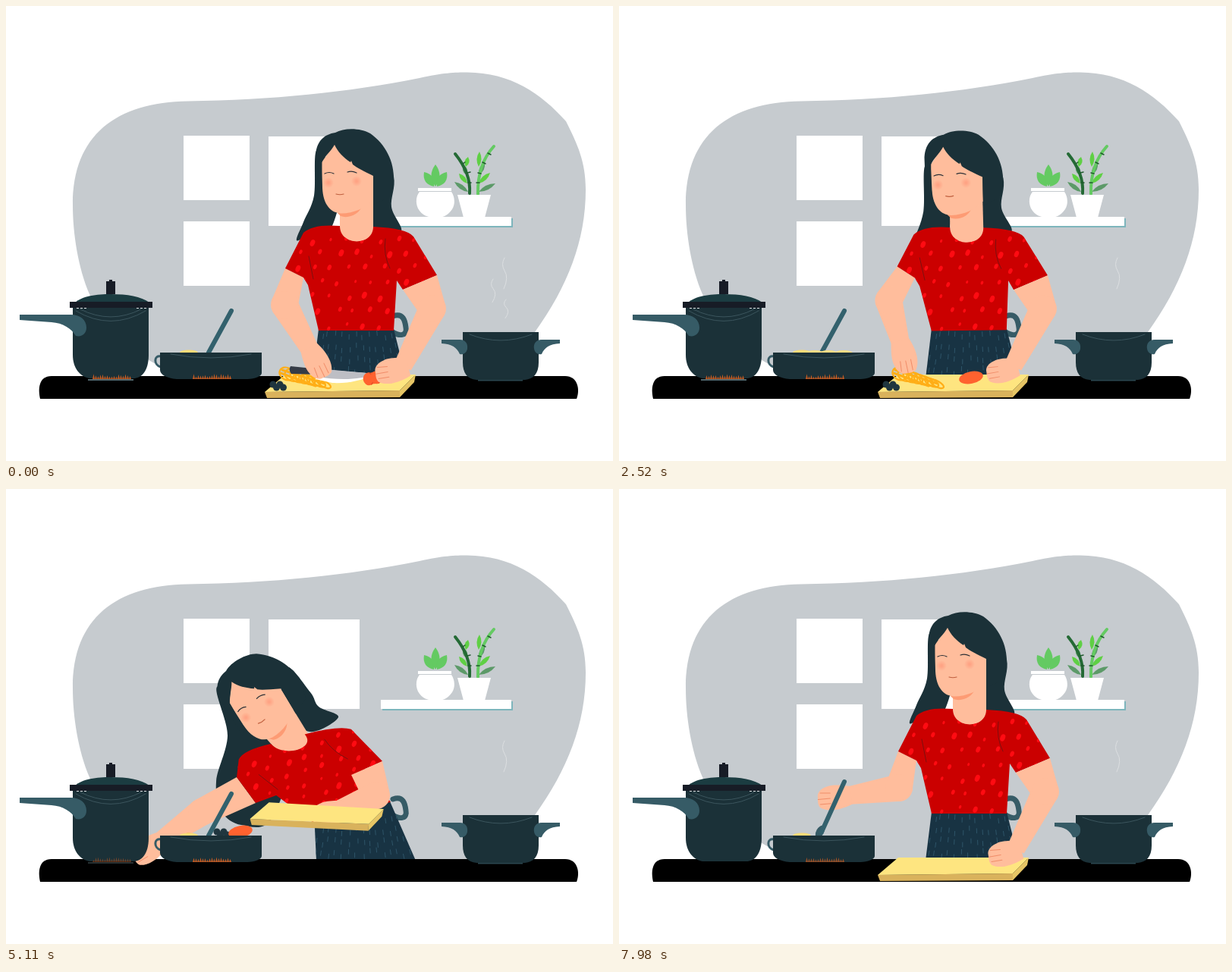
An HTML page with a canvas for the animation above (8000 ms loop, 800 px wide and 600 px high).

```html
<!DOCTYPE html>
<html lang="en">
<head>
<meta charset="utf-8">
<title>Kitchen</title>
<style>
html, body { margin: 0; width: 100%; height: 100%; overflow: hidden; background: #fff; }
canvas { display: block; width: 800px; height: 600px; }
</style>
</head>
<body>
<canvas id="stage" width="800" height="600"></canvas>
<script>
const g = document.getElementById('stage').getContext('2d');
const LOOP = 8000, STEP = 70;
const DARK = '#1b3138', TEAL = '#365b66', SKIN = '#ffbd9c', LINE = '#f08d69';
const ORANGE = '#ff622f', YELLOW = '#ffae17', RIM = '#3b555d', BLACK = '#171c26';

// ---- drawing helpers
const shape = d => d instanceof Path2D ? d : new Path2D(d);
const fill = (d, color) => { g.fillStyle = color; g.fill(shape(d)); };
const stroke = (d, color, width = 1) => {
  g.strokeStyle = color; g.lineWidth = width; g.lineCap = 'round';
  g.stroke(shape(d));
};
const box = (x, y, w, h, color) => { g.fillStyle = color; g.fillRect(x, y, w, h); };
const ellipse = (x, y, rx, ry, turn = 0) => {
  const d = new Path2D();
  d.ellipse(x, y, rx, ry, turn, 0, 7);
  return d;
};
const placed = (x, y, turn, draw) => {
  g.save(); g.translate(x, y); g.rotate(turn); draw(); g.restore();
};
const faded = (alpha, draw) => { g.save(); g.globalAlpha = alpha; draw(); g.restore(); };
const poly = pts => `M${pts.join('L')}Z`;
// closed smooth curve that passes through the points
const smooth = pts => {
  const p = i => pts[(i + pts.length) % pts.length];
  const lead = (i, side) => [0, 1].map(c => p(i)[c] + side * (p(i + 1)[c] - p(i - 1)[c]) / 6);
  return `M${p(0)}` + pts.map((_, i) => `C${lead(i, 1)} ${lead(i + 1, -1)} ${p(i + 1)}`).join('') + 'Z';
};

// ---- motion helpers
const rnd = n => { const s = Math.sin(n * 12.9898) * 43758.5453; return s - Math.floor(s); };
const lerp = (a, b, k) => a + (b - a) * k;
const mix = (a, b, k, ky = k) => [lerp(a[0], b[0], k), lerp(a[1], b[1], ky)];
const ramp = (from, to, t) => {
  const k = Math.min(1, Math.max(0, (t - from) / (to - from)));
  return k * k * (3 - 2 * k);
};
const pulse = (a, b, c, d, t) => ramp(a, b, t) - ramp(c, d, t);

// ---- room
function leaf(x, y, tx, ty, w, color) {
  const dx = tx - x, dy = ty - y, n = Math.hypot(dx, dy) / w;
  const mx = x + dx / 2, my = y + dy / 2;
  fill(`M${x} ${y}Q${mx - dy / n} ${my + dx / n} ${tx} ${ty}Q${mx + dy / n} ${my - dx / n} ${x} ${y}`, color);
}

function room() {
  fill('M88 262C88 170 145 127 240 125.5C350 124 450 114 545 95C575 88 592 87.5 608 87.5C665 88 705 115 738 152C753 182 764 205 764 242C764 310 740 370 697 430C680 455 660 475 640 489H240C215 483 188 468 170 455C150 440 125 410 110 380C95 345 88 300 88 262Z', '#c6cbcf');
  box(234, 171, 87, 85, '#fff');
  box(234, 284, 87, 85, '#fff');
  box(346, 172, 120, 118, '#fff');
  box(496, 280, 172, 12, '#7db5bc');
  box(494, 278, 172, 12, '#fff');
  plants();
}

function plants() {
  const green = '#64ca62', deep = '#246a35', dull = '#5c9a68', lime = '#5fd044';
  box(543, 240, 44, 4, '#fff');
  fill('M545 245H587C592 252 592 262 588 268C582 277 575 279 566 279C556 279 548 276 543 267C539 258 541 250 545 245Z', '#fff');
  for (const side of [-1, 0, 1])
    leaf(566 + side * 2, 238, 566 + side * 15, 209 + Math.abs(side) * 10, 11, green);
  // pairs of leaves climb both stems
  for (let i = 0; i < 4; i++) {
    const y = 245 - i * 11;
    leaf(609 - i, y, 591 + i * 6, y - 13, 6, i % 2 ? lime : dull);
    leaf(623, y, 645 - i * 7, y - 11 - i * 3, 6, i % 2 ? lime : dull);
  }
  stroke('M611 247Q613 221 592 195', deep, 4);
  stroke('M622 248Q621 209 643 185', green, 4);
  stroke('M609 233h4M608 220l4 -1M602 208l3 -2M620 233h4M622 220l4 1M628 206l4 2M635 194l4 2', '#1f5a2c', 1.5);
  fill('M595 249H639L631 279H603Z', '#fff');
}

function steam(t) {
  const wisp = (x, y, alpha, h = 1) => faded(alpha, () =>
    stroke(`M${x} ${y}q-5 ${9 * h} 0 ${17 * h}q6 ${9 * h} -1 ${24 * h}`, '#dcdfe1'));
  const puff = 1 - pulse(800, 1300, 2500, 3000, t) - ramp(4500, 4900, t);
  wisp(657, 332, 1);
  wisp(642, 360, puff, .75);
  wisp(659, 387, puff * (1 - pulse(800, 1300, 3400, 3900, t)), .6);
  wisp(298, 370, pulse(2700, 3200, 3200, 3700, t), .6);
  wisp(267, 382, pulse(5900, 6400, 6500, 7000, t), 1.2);
}

// ---- cook: "lean" runs from 0 (upright) to 1 (bent over the pan)

// moves a point of the upright torso: slides, tilts and shears about the neck
const torso = lean => (x, y) => {
  const dx = x - 440, dy = y - 290;
  return [440 - 91 * lean + dx + .63 * lean * dy,
    290 + 46 * lean - .3 * lean * dx + (1 - .29 * lean) * dy];
};

function limb(a, b, elbow, wrist) {
  const across = (p, q, r) => {
    const n = Math.hypot(q[0] - p[0], q[1] - p[1]) / r;
    return [(p[1] - q[1]) / n, (q[0] - p[0]) / n];
  };
  const off = (p, v, s) => [p[0] + v[0] * s, p[1] + v[1] * s];
  const middle = mix(a, b, .5);
  const u = across(middle, elbow, 18), w = across(elbow, wrist, 18), end = across(elbow, wrist, 12);
  fill(poly([a, b, off(elbow, u, -1), off(elbow, u, 1)]), SKIN);
  fill(poly([off(elbow, w, 1), off(elbow, w, -1), off(wrist, end, -1), off(wrist, end, 1)]), SKIN);
  fill(ellipse(...elbow, 18, 18), SKIN);
}

function hand(x, y, turn, long = 1, wide = 1) {
  placed(x, y, turn, () => {
    g.scale(long, wide);
    fill('M-22 -12C0 -19 14 -16 21 -10C24 -4 22 0 22 4C22 10 16 15 8 16C0 18 -12 15 -22 12Z', SKIN);
    stroke('M6 -7L20 -6M6 0L22 1M5 7L18 9', LINE);
  });
}

function hair(lean) {
  const fall = Math.pow(lean, .4);
  const strand = (upright, bent, ky) =>
    fill(smooth(upright.map((p, i) => mix(p, bent[i], lean, ky))), DARK);
  strand([[410, 190], [406, 250], [392, 285], [383, 309], [400, 302], [425, 300], [440, 240]],
    [[281, 260], [292, 325], [277, 385], [284, 425], [310, 443], [350, 435], [370, 340]], fall);
  strand([[490, 180], [511, 225], [508, 265], [521, 297], [490, 300], [470, 240]],
    [[370, 235], [401, 268], [412, 287], [438, 301], [400, 320], [365, 290]], lean);
}

function head(lean) {
  placed(443.5 - 112 * lean, 232 + 59 * lean, -.54 * lean, () => {
    g.translate(-443.5, -232);
    fill('M436 272C450 274 460 270 469 264C466 274 452 281 441 277Z', '#fd9b74');
    fill('M416 206L433 182L470 195H484V256C475 266 458 273.5 442 273.5C428 273 418 262 417 240Z', SKIN);
    for (const [x, y] of [[425, 233], [462, 231]]) {
      const blush = g.createRadialGradient(x, y, 1, x, y, 7);
      blush.addColorStop(0, '#ffa384');
      blush.addColorStop(1, '#ffa38400');
      fill(ellipse(x, y, 7, 7), blush);
    }
    stroke('M420 221Q426 218 432 221M450 219Q456 217 462 220', '#2b3036', 1.2);
    stroke('M435 248Q440 249.5 445 248', '#c0603f', 1.2);
    fill('M408 200C408 178 420 169 434 167C446 160 468 161 480 168C500 182 512 205 511 230L506 252L484 262V224C472 218 462 213 457 209L455 204L454 206C445 200 437 192 433 183C428 192 419 199 416.5 206C416 225 416 235 417 245L409 250Z', DARK);
  });
}

function skirt(lean, at) {
  const d = shape(poly([at(412, 426), at(511, 426), [527 + 13 * lean, 490], [404 + 5 * lean, 490]]));
  fill(d, '#183343');
  g.save();
  g.clip(d);
  for (let i = 0; i < 60; i++) {
    const x = 405 + i % 15 * 9 + rnd(i) * 5, y = 428 + Math.floor(i / 15) * 15 + rnd(i + 70) * 9;
    stroke(`M${x} ${y}l${(x - 460) / 50} 6`, '#2d5468');
  }
  g.restore();
}

function shirt(at, left, right) {
  const d = shape(`M${at(440, 290)}Q${at(405, 287)} ${at(392, 299)}L${left[0]}L${left[1]}L${at(398, 368)}
    L${at(412, 428)}L${at(511, 428)}L${at(515, 362)}L${right[0]}L${right[1]}L${at(537, 304)}
    Q${at(528, 293)} ${at(484, 291)}C${at(484, 317)} ${at(440, 317)} ${at(440, 290)}Z`);
  fill(d, '#cb0000');
  g.save();
  g.clip(d);
  for (let i = 0; i < 56; i++) {
    const row = Math.floor(i / 8), r = 1.4 + rnd(i) * 1.8;
    const x = 376 + i % 8 * 23 + row % 2 * 11 + rnd(i + 20) * 9, y = 304 + row * 19 + rnd(i + 40) * 9;
    fill(ellipse(...at(x, y), r, r * 1.5, .4), '#ff0b12');
  }
  stroke(`M${at(500, 307)}Q${at(497, 328)} ${at(506, 346)}M${at(399, 330)}L${at(405, 360)}`, '#7d1010');
  g.restore();
}

// elbow and wrist of the stirring arm: chop, reach, steady, pour, rest, stir
const ARM = [
  [0, 367, 394, 400, 452], [2150, 367, 394, 400, 452], [3220, 325, 373, 294, 419],
  [4200, 279, 391, 222, 430], [5110, 258, 426, 204, 464], [5280, 258, 426, 204, 464],
  [6400, 371, 399, 374, 467], [6900, 371, 399, 374, 467], [7600, 369, 394, 304, 404], [LOOP, 369, 394, 304, 404]];

function armPose(t) {
  const i = ARM.findIndex(row => row[0] > t), a = ARM[i - 1], b = ARM[i];
  const [, ex, ey, wx, wy] = a.map((v, c) => lerp(v, b[c], ramp(a[0], b[0], t)));
  return { elbow: [ex, ey], wrist: [wx, wy] };
}

// ---- board and food
function board(lift) {
  placed(442 - 31 * Math.sin(lift * Math.PI / 2), 497 - 69 * lift, .08 * Math.sin(lift * Math.PI * .75), () => {
    g.scale(1 - .12 * lift, 1);
    fill('M-101 12L77 10V19L-98 20Z', '#d9b25c');
    fill('M98 -11L96 -1L77 19V10Z', '#e6c565');
    fill('M-74 -11H98L77 10L-101 12Z', '#fee580');
  });
}

function noodles() {
  for (let i = 0; i < 8; i++)
    stroke(ellipse(-22 + i * 7, -5 + i * 1.9, 10, 8 - i * .6, .5), YELLOW, 2.2);
  stroke('M-28 -10L28 8M-30 -6L16 11', YELLOW, 3);
}

function berries() {
  for (let i = 0; i < 4; i++) fill(ellipse(-7 + i * 4.5, i % 2 * 4 - 1, 4.5, 4.5), '#20363f');
}

function carrot(t) {
  fill(ellipse(0, 0, 16, 8), ORANGE);
  if (t < 2500) for (const x of [-9, 1, 10]) {
    fill(ellipse(x, 0, 7.5, 8.5), ORANGE);
    stroke(`M${x + 2} -8q8 8 0 16`, '#d94a22');
  }
}

function knife(chop) {
  placed(487, 485, -chop * .012, () => {
    fill('M-75 -6L0 0C-17 9 -37 13 -57 12L-79 7Z', '#fff');
    fill('M-77 -7L0 0C-19 8 -47 9 -77 4Z', '#bdbec4');
    fill('M-112 -10Q-115 -5 -111 0L-75 1L-73 -6Z', '#353c46');
  });
}

function food(t, lift, chop) {
  const slide = ramp(4400, 5080, t), drop = 30 * ramp(5110, 5300, t);
  const toPan = (x, y, panX, panY, turn, draw) => {
    const [px, py] = mix([x, y - 69 * lift], [panX, panY], slide);
    placed(px, py + drop, turn, draw);
  };
  if (t > 5320) return;
  toPan(392, 490, 265, 468, 0, noodles);
  toPan(359, 500, 285, 453, 0, berries);
  if (t < 2350) knife(chop);
  toPan(464 + 23 * (1 - ramp(0, 1650, t)), 490, 309, 452, -.2, () => carrot(t));
}

// ---- pots
function flame(x, y, seed, alpha) {
  let d = `M${x} ${y}`;
  for (let i = 1; i < 18; i++) d += `l1.5 ${-3 - rnd(seed + i) * 4}L${x + 3 * i} ${y}`;
  faded(alpha, () => fill(d + 'Z', '#c25a22'));
}

function pan(t, step) {
  const lift = 16 * ramp(7100, 7700, t), simmer = pulse(700, 1300, 4400, 5000, t);
  if (lift > 2) fill(ellipse(265, 452, 5, 9, .5), TEAL);
  stroke(`M297 ${402 - lift}L267 ${457 - lift * .3}`, '#33616d', 6);
  fill(ellipse(241, 457, 12, 3.5), '#fbdc78');
  for (const x of [258, 276, 296]) fill(ellipse(x, 459, 13, 5 * simmer), '#f9dd84');
  stroke('M204 462C195 460 194 473 204 476', TEAL, 3);
  fill('M203 457H337V484C337 488 328 492 318 492H225C212 491 203 486 203 480Z', DARK);
  stroke('M217 459Q270 469 323 459', RIM);
  flame(246, 492, step * 3, t > 5900 ? .75 : 1);
}

function cooker(t, step) {
  const hop = 4 * pulse(1350, 1680, 1680, 2000, t), heat = 1 - ramp(4800, 5400, t);
  box(136, 372, 4, 10, TEAL);
  box(132, 363 - hop, 12, 17, BLACK);
  box(136, 361 - hop, 4, 3, BLACK);
  fill('M88 396H188V460C188 482 178 491 168 491H110C98 489 88 478 88 460Z', DARK);
  fill('M90 392C100 382 120 380 138 380C160 380 178 383 189 391Z', '#1b3c41');
  box(84, 390, 109, 8, BLACK);
  for (let i = 0; i < 6; i++) box(93 + i * 5 + (i > 2 ? 64 : 0), 398, 3, 1, '#dfe3e5');
  stroke('M92 402Q138 429 184 402M98 400Q138 420 178 400', RIM);
  fill('M18 407H85C98 407 106 414 106 424C106 432 100 437 92 435C86 425 75 418 60 417L18 414Z', TEAL);
  faded(heat, () => box(108, 492, 60, 2, '#52676d'));
  flame(114, 492, step * 5 + 40, heat);
}

function stewPot() {
  fill('M602 430H702V470C702 485 695 492 684 493H620C608 492 602 484 602 470Z', DARK);
  for (const side of [1, -1]) placed(652, 0, 0, () => {
    g.scale(side, 1);
    fill('M-78 440H-54C-46 440 -43 446 -44 452C-45 458 -50 460 -54 459C-58 450 -64 446 -78 445Z', TEAL);
  });
  stroke('M611 433Q652 449 693 433', RIM);
  box(622, 493, 59, 1.5, '#2b464f');
}

// ---- scene
function draw(t) {
  const step = Math.floor(t / STEP);
  const lean = pulse(2150, 5150, 5280, 6420, t), lift = pulse(3400, 5050, 5300, 6300, t);
  const raise = Math.sin(Math.PI * lean), at = torso(lean);
  const chop = t < 2100 ? 3 * Math.abs(Math.sin(Math.PI * t / 420)) : 0;
  const { elbow, wrist } = armPose(t);
  wrist[1] -= chop;

  const leftCuff = [[368 - 64 * lean + 10 * raise, 346 + 34 * lean - 30 * raise],
    [392 - 63 * lean + 4 * raise, 358 + 56 * lean - 15 * raise]];
  const rightCuff = [mix([523, 374], [455, 377], lean), mix([568, 355], [496, 359], lean)];
  const rightElbow = mix([562, 399], [488, 404], lean);
  const rightWrist = mix([523, 475], [440, 422], lean, lean ** 3);
  const rightHand = () => hand(rightWrist[0] - 14, rightWrist[1] + 6, 2.9, 1 - .35 * raise, 1 - .3 * raise);

  box(0, 0, 800, 600, '#fff');
  room();
  steam(t);
  stroke('M510 409C524 404 526 416 527 424C529 434 520 437 508 429', TEAL, 7);
  hair(lean);
  fill(poly([mix([440, 255], [335, 320], lean), mix([484, 245], [364, 267], lean), at(484, 316), at(440, 316)]), SKIN);
  skirt(lean, at);
  fill('M45 518C42 505 43 488 60 488H737C753 488 757 505 752 518Z', '#000');
  limb(...leftCuff, elbow, wrist);
  shirt(at, leftCuff, rightCuff);
  limb(...rightCuff, rightElbow, rightWrist);
  head(lean);
  if (lift > 0) rightHand();
  board(lift);
  food(t, lift, chop);
  if (lift === 0) rightHand();

  const flat = pulse(5900, 6400, 6900, 7300, t);
  const aim = Math.atan2(wrist[1] - elbow[1], wrist[0] - elbow[0]);
  hand(wrist[0] + 20 * Math.cos(aim) - 8 * flat, wrist[1] + 20 * Math.sin(aim) - 6 * flat,
    aim + 1.4 * flat, 1 + .6 * flat, 1 - .4 * flat);
  pan(t, step);
  cooker(t, step);
  stewPot();
}

const start = performance.now();
function tick() {
  const t = (performance.now() - start) % LOOP;
  draw(Math.floor(t / STEP) * STEP);
  requestAnimationFrame(tick);
}
tick();
</script>
</body>
</html>
```
